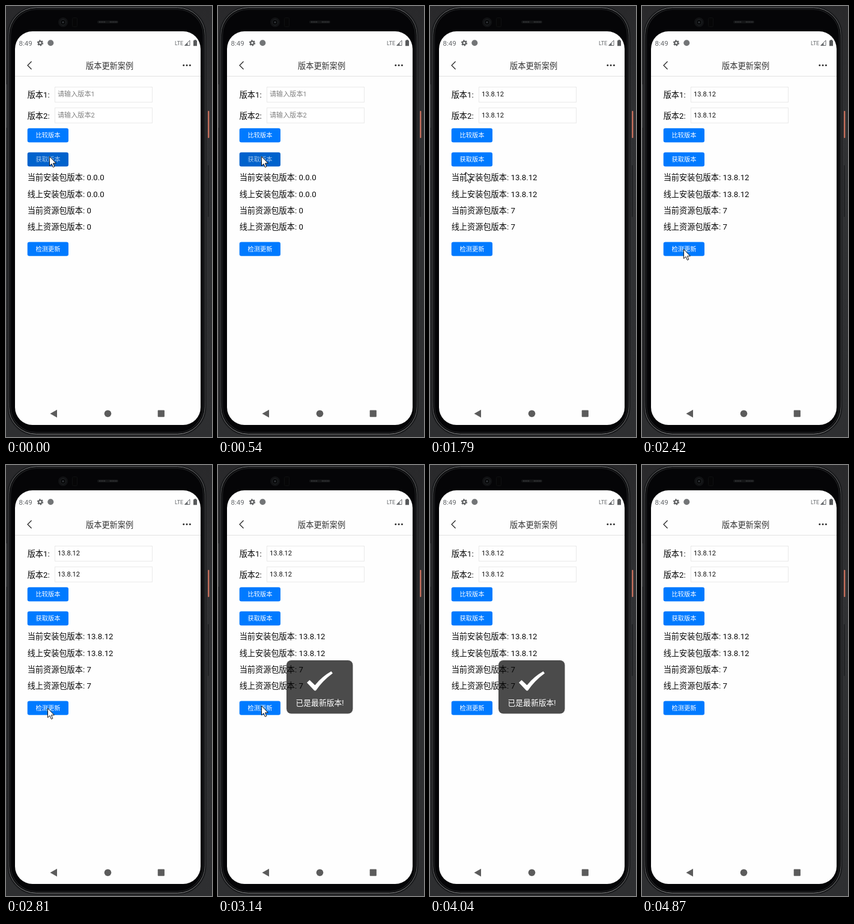
These frames come from a looping animation (343x715 px, 5310 ms). An HTML page:

```html
<!DOCTYPE html>
<html lang="zh-CN">
<head>
<meta charset="utf-8">
<title>版本更新案例</title>
<style>
  html, body { margin: 0; width: 100%; height: 100%; overflow: hidden; background: #2d2e30; }
  svg { display: block; width: 100vw; height: 100vh; }
  text { font-family: Roboto, "Noto Sans CJK SC", "Noto Sans CJK", sans-serif; white-space: pre; }
  .label { font-size: 13.2px; fill: #0a0a0a; }
  .field { font-size: 11.1px; }
  .button { font-size: 10.2px; fill: #fff; }
</style>
</head>
<body>
<svg id="stage" viewBox="0 0 343 715">
  <defs>
    <linearGradient id="back" x2="0" y2="1">
      <stop offset="0" stop-color="#29292b"/>
      <stop offset=".3" stop-color="#303133"/>
      <stop offset="1" stop-color="#2e2f31"/>
    </linearGradient>
    <linearGradient id="rim" x2="0" y2="1">
      <stop offset="0" stop-color="#77787a"/>
      <stop offset=".08" stop-color="#4b4c4e"/>
      <stop offset=".92" stop-color="#4b4c4e"/>
      <stop offset="1" stop-color="#8a8b8c"/>
    </linearGradient>
    <linearGradient id="power">
      <stop offset="0" stop-color="#8d4c40"/>
      <stop offset=".6" stop-color="#e0806a"/>
      <stop offset="1" stop-color="#b5614f"/>
    </linearGradient>
  </defs>

  <!-- Phone body -->
  <rect width="343" height="715" fill="url(#back)"/>
  <rect x="0" y="130" width="2" height="72" fill="#3c3d3f"/>
  <rect x="336" y="174" width="2.4" height="45" rx="1" fill="url(#power)"/>
  <rect x="336" y="264" width="1.5" height="86" rx=".7" fill="#1c1d1f"/>
  <rect x="4" y="2.2" width="328" height="708.8" rx="46" fill="#08080a" stroke="#1a1b1d" stroke-width="3"/>
  <rect x="4.8" y="2.8" width="326.4" height="707.4" rx="45.5" fill="#050506" stroke="url(#rim)"/>
  <rect x="7.5" y="5.5" width="321" height="702" rx="43" fill="#050507" stroke="#1d1e20" stroke-width="1.5"/>

  <!-- Camera and speaker -->
  <circle cx="95" cy="27" r="8" fill="#111214"/>
  <circle cx="95" cy="27" r="4.6" fill="#08090a" stroke="#222427"/>
  <circle cx="95" cy="27" r="1.6" fill="#33373c"/>
  <rect x="110.5" y="19.5" width="8" height="15" rx="2" fill="#060607" stroke="#0f1011"/>
  <rect x="152" y="24.2" width="35" height="4.6" rx="2.3" fill="#151617"/>
  <path d="M155 26.5H166M173 26.5H185" stroke="#3d3e40" stroke-width="1.8" stroke-dasharray="1.5 1.2"/>

  <!-- Screen -->
  <rect x="15" y="42" width="309" height="653" rx="29" fill="#fefefe"/>
  <text x="21.6" y="65.8" font-size="11.5" fill="#66696c">8:49</text>
  <circle cx="57" cy="61.3" r="4.4" fill="none" stroke="#5d5f61" stroke-width="1.5" stroke-dasharray="2.3 2.3"/>
  <circle cx="57" cy="61.3" r="2.8" fill="none" stroke="#5d5f61" stroke-width="2.1"/>
  <circle cx="74.3" cy="61.3" r="5" fill="#737577"/>
  <text x="281" y="65" font-size="9" fill="#66696c">LTE</text>
  <path d="M297.5 65.5L306 57V65.5Z" fill="none" stroke="#66696c"/>
  <path d="M298 65.5L302.5 61V65.5Z" fill="#66696c"/>
  <path d="M312 57.3H313.7V56H316.3V57.3H318V66.3H312Z" fill="#57595b"/>

  <path d="M42.5 92L36 98.5L42.5 105" fill="none" stroke="#222" stroke-width="1.2"/>
  <text x="172.6" y="104.3" font-size="13.2" fill="#333" text-anchor="middle">版本更新案例</text>
  <g fill="#222">
    <circle cx="295.8" cy="98.4" r="1.45"/>
    <circle cx="301.1" cy="98.4" r="1.45"/>
    <circle cx="306.4" cy="98.4" r="1.45"/>
  </g>
  <path d="M15 116.5H324" stroke="#e2e2e2"/>

  <g id="page"></g>

  <g fill="#5c5c5c">
    <path d="M73.5 676.3L85 669.8V682.8Z"/>
    <circle cx="169.5" cy="676.2" r="5.8"/>
    <rect x="252.7" y="670.6" width="11.2" height="11.2" rx="1"/>
  </g>

  <g id="toast">
    <rect x="114" y="324" width="110.5" height="88.5" rx="8" fill="#000" fill-opacity=".7"/>
    <path d="M148 361L152.5 356.8L161.5 365.2Q173 351 188.5 342.3L191 345.5Q174 358 163.3 373.8Q161.8 375.3 160 373.8Z" fill="#fff"/>
    <text x="129.5" y="399.3" font-size="12.8" fill="#fff">已是最新版本!</text>
  </g>

  <path id="cursor" d="M.5 .7V16L4 12.8L6.4 18.5L8.8 17.5L6.5 11.9H11.4Z" fill="#fff" stroke="#111" stroke-width="1" stroke-linejoin="round"/>
</svg>
<script>
const LOOP = 5310;
const $ = id => document.getElementById(id);

function add(tag, attrs, content = "") {
  const el = document.createElementNS("http://www.w3.org/2000/svg", tag);
  for (const key in attrs) el.setAttribute(key, attrs[key]);
  el.textContent = content;
  $("page").append(el);
  return el;
}

const write = (cls, x, y, content) => add("text", { class: cls, x, y }, content);

function makeField(n, y) {
  write("label", 35.7, y + 18, `版本${n}:`);
  add("rect", { x: 81.5, y: y + .5, width: 162, height: 25, fill: "#fff", stroke: "#e9e9e9" });
  const text = write("field", 86, y + 16.2, "");
  return filled => {
    text.textContent = filled ? "13.8.12" : `请输入版本${n}`;
    text.style.fill = filled ? "#111" : "#808080";
  };
}

function makeButton(y, title) {
  const box = add("rect", { x: 35.7, y, width: 68.3, height: 23.4, rx: 3.3 });
  const text = write("button", 49.6, y + 15.3, title);
  return pressed => {
    box.style.fill = pressed ? "#0062cc" : "#007aff";
    text.style.fillOpacity = pressed ? .65 : 1;
  };
}

function makeRow(y, title, empty, full) {
  const text = write("label", 35.7, y, "");
  return filled => { text.textContent = `${title}: ${filled ? full : empty}`; };
}

const fillers = [
  makeField(1, 134),
  makeField(2, 168.5),
  makeRow(289.3, "当前安装包版本", "0.0.0", "13.8.12"),
  makeRow(316.6, "线上安装包版本", "0.0.0", "13.8.12"),
  makeRow(343.5, "当前资源包版本", "0", "7"),
  makeRow(370.6, "线上资源包版本", "0", "7")
];
makeButton(202.8, "比较版本")(false);
const pressFetch = makeButton(242.8, "获取版本");
const pressCheck = makeButton(391.4, "检测更新");

// Pointer path: time, x, y
const path = [
  [0, 72, 249], [1789, 72, 249], [1790, 59, 275], [1940, 53, 308],
  [2120, 56, 362], [2300, 65, 403], [2389, 65, 403], [2390, 67, 403],
  [2420, 69, 403], [3049, 69, 403], [3050, 70, 402], [3140, 72, 399],
  [3230, 92, 425], [3410, 178, 560], [3560, 234, 647], [3740, 268, 678],
  [3920, 293, 702], [4040, 304, 720], [4719, 304, 720], [4720, 287, 707],
  [4770, 263, 701], [4820, 230, 707], [4869, 230, 707], [4870, 230, 730],
  [LOOP, 230, 730]
];

function pointerAt(t) {
  const i = Math.max(1, path.findIndex(key => key[0] > t));
  const [t0, x0, y0] = path[i - 1], [t1, x1, y1] = path[i];
  const k = (t - t0) / (t1 - t0);
  return [x0 + (x1 - x0) * k, y0 + (y1 - y0) * k].map(Math.round);
}

const within = (t, from, to) => t >= from && t < to;

function draw(t) {
  const filled = t >= 940;
  fillers.forEach(fill => fill(filled));
  pressFetch(t < 30 || within(t, 540, 880));
  pressCheck(within(t, 2690, 2780));
  $("toast").style.display = within(t, 2900, 4190) ? "" : "none";

  // The pointer moves in ticks of 30 ms
  const tick = within(t, 1790, 4190) ? t - (t - 1790) % 30 : t;
  $("cursor").setAttribute("transform", `translate(${pointerAt(tick)})`);
}

const start = performance.now();
function frame() {
  draw((performance.now() - start) % LOOP);
  requestAnimationFrame(frame);
}
frame();
</script>
</body>
</html>
```
